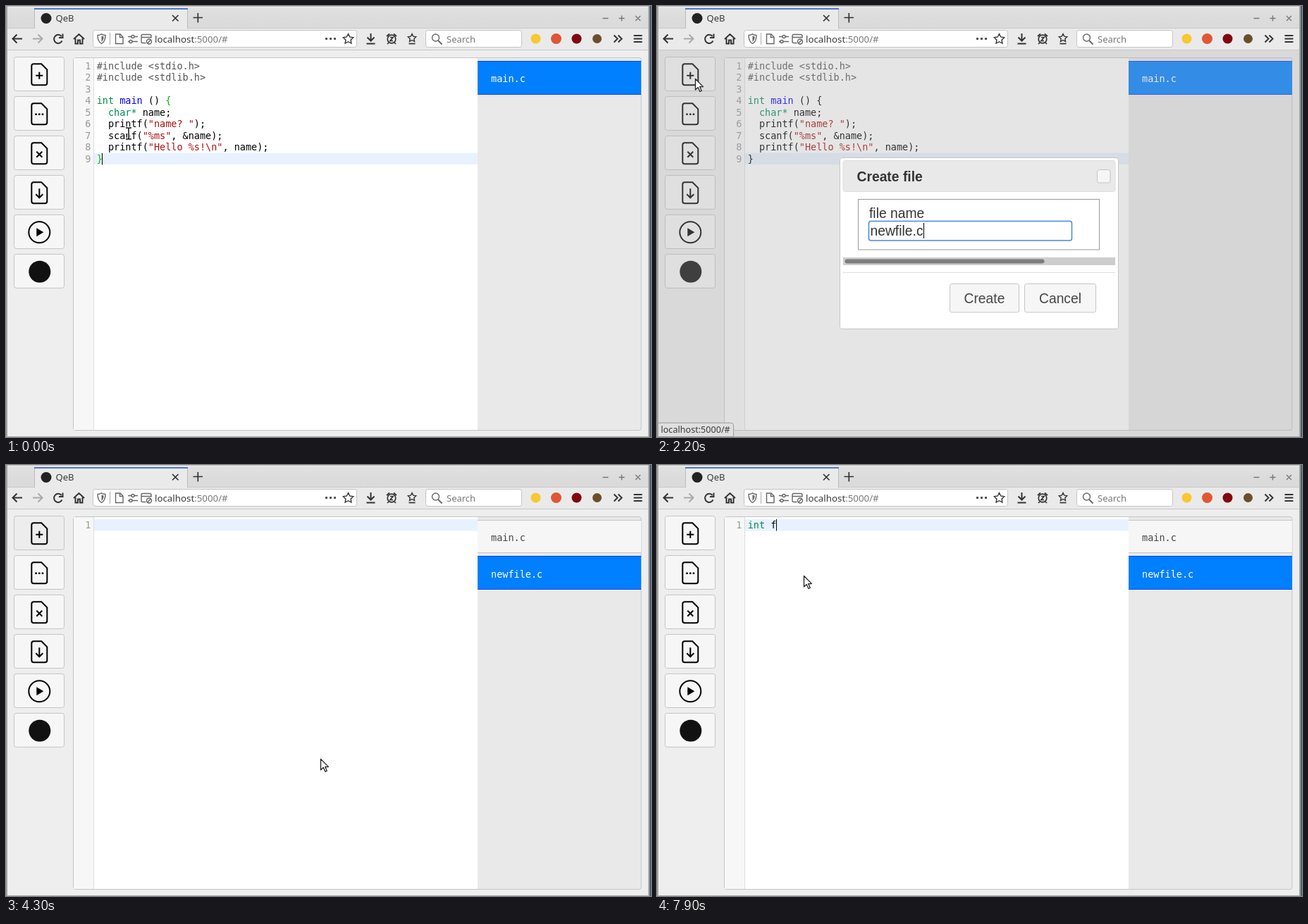
These frames come from a looping animation (915x612 px, 8 s). An HTML page:

```html
<!DOCTYPE html>
<html lang="en">
<head>
<meta charset="utf-8">
<title>Code editor</title>
<style>
html, body { margin: 0; width: 100%; height: 100%; overflow: hidden; background: #eee; }
svg { display: block; width: 915px; height: 612px; }
text { white-space: pre; }
.ui { font: 13.3px "Noto Sans", sans-serif; fill: #3a3a3a; }
.code { font: 13.5px "DejaVu Sans Mono", monospace; }
.dialog { font: 19.3px "Liberation Sans", Arial, sans-serif; fill: #333; }
.num { fill: #999; text-anchor: end; }
.line { fill: none; stroke: #333; stroke-width: 1.7; }
.bold { stroke-width: 2; }
.icon { fill: none; stroke: #000; stroke-width: 2; }
.box { fill: #f6f6f6; stroke: #c5c5c5; }
.on { fill: #007fff; stroke: #003eff; }
.meta { fill: #555; } .type { fill: #085; } .def { fill: #00f; } .str { fill: #a11; }
.match { fill: #0b0; }
.blurred .match { fill: #000; }
</style>
</head>
<body>
<svg viewBox="0 0 915 612">
  <defs>
    <linearGradient id="titleBar" x2="0" y2="1">
      <stop stop-color="#e2e2e2"/><stop offset=".5" stop-color="#dcdcdc"/><stop offset="1" stop-color="#dadada"/>
    </linearGradient>
    <clipPath id="panel"><path d="M669 74H901V602H669Z"/></clipPath>
  </defs>

  <!-- window frame, tab strip, toolbar -->
  <rect width="915" height="612" fill="#eee"/>
  <rect width="915" height="32" fill="url(#titleBar)"/>
  <path d="M0 .5H915" stroke="#bbb"/>
  <path d="M0 1.5H915" stroke="#efefef"/>
  <rect y="32" width="915" height="31" fill="#eaeaea"/>
  <path d="M2 31.5H40M258 31.5H912M2 62.5H912" stroke="#c8c8c8"/>
  <rect x="40" y="3" width="218" height="29" fill="#eaeaea"/>
  <path d="M40.5 4V32M257.5 4V32" stroke="#bbb"/>
  <rect x="40" y="3" width="218" height="2" fill="#5179c4"/>
  <circle cx="57" cy="17.500" r="7.500" fill="#222"/>
  <text class="ui" x="70.500" y="22" style="font-size:13px">QeB</text>
  <path class="line" d="M236 13l8.500 8.500M244.500 13l-8.500 8.500M265.500 16.500h13.500M272.300 10v13.500"/>
  <path class="line" style="stroke:#777;stroke-width:1.4" d="M846.500 17.500h8M869.500 17.500h8M873.500 13.500v8M893 14l7 7M900 14l-7 7"/>
  <path class="line bold" d="M23 46.500H10M15.500 40.500l-6 6 6 6"/>
  <path class="line bold" style="stroke:#aaa" d="M38 46.500H51M45.500 40.500l6 6-6 6"/>
  <path class="line bold" d="M79.500 49.500a6 6 0 1 1-.8-6.500M80.500 39.500v5.500h-5.500"/>
  <path class="line bold" d="M96 47l7.500-7 7.500 7M98.500 46v7.500h3.500v-5h3v5h3.500V46"/>
  <g fill="#fff" stroke="#c4c4c4">
    <rect x="123.500" y="34.500" width="374" height="24" rx="3"/>
    <rect x="595.500" y="34.500" width="136" height="24" rx="3"/>
  </g>
  <text class="ui" x="211" y="51.500">localhost<tspan fill="#777">:5000/#</tspan></text>
  <text class="ui" x="625" y="51.500" style="fill:#777;font-size:13px">Search</text>
  <path d="M147.500 38V55" stroke="#aaa"/>
  <g class="line" style="stroke:#666;stroke-width:1.4">
    <path d="M130 41.500q3.500 0 5.500-1.700q2 1.700 5.500 1.700q0 9-5.500 12q-5.500-3-5.500-12Z"/>
    <path d="M135.500 42.500v8.500q3-2.500 3.200-7.500Z" fill="#666" stroke="none"/>
    <path d="M155.500 40h6.500l4 4v9.500h-10.500ZM161.500 40v4.500h4.500"/>
    <path d="M173 43.500h5M182 43.500h5M173 50.500h2M179 50.500h8"/>
    <circle cx="180" cy="43.500" r="2"/><circle cx="177" cy="50.500" r="2"/>
    <path d="M198.500 52.500h-4.500q-2 0-2-2v-8q0-2 2-2h10q2 0 2 2v3M192 44.500h14"/>
    <circle cx="203" cy="50.500" r="3.500"/><path d="M200.500 53l5-5"/>
    <circle cx="609.500" cy="45" r="5"/><path d="M613 49l5.500 5.500" stroke-width="2"/>
  </g>
  <path d="M453 46.500h3m3 0h3m3 0h3" stroke="#555" stroke-width="3"/>
  <path class="line" id="star" style="stroke-width:1.4"/>
  <path class="line" id="trayStar" style="stroke-width:1.4"/>
  <path class="line" d="M571.500 53.500h9"/>
  <path class="line bold" d="M517.500 39v10M512.500 44.500l5 5 5-5M511.500 53.500h12"/>
  <circle class="line" cx="547" cy="47" r="5.800"/>
  <path class="line" d="M540 43l4-3.500M554 43l-4-3.500M545 44.500h4l-4 5h4M543 52l-2 2M551 52l2 2"/>
  <circle cx="751.500" cy="46.500" r="7" fill="#f8c832"/>
  <circle cx="780.500" cy="46.500" r="7.500" fill="#de5833"/>
  <circle cx="809.500" cy="46.500" r="7" fill="#800610"/>
  <circle cx="838.500" cy="46.500" r="6.500" fill="#6b4e2c"/>
  <path class="line bold" d="M862.500 41.500l5 5-5 5M868.500 41.500l5 5-5 5M890.500 42h12M890.500 46.500h12M890.500 51h12"/>

  <!-- page -->
  <g id="tools"></g>
  <rect x="95.500" y="73.500" width="805.500" height="529" rx="3" fill="#e9e9e9" stroke="#c5c5c5"/>
  <rect x="96" y="74" width="28" height="528" fill="#f7f7f7"/>
  <rect x="125" y="74" width="544" height="528" fill="#fff"/>
  <path d="M124.500 74V602" stroke="#ddd"/>
  <rect id="activeLine" x="125" width="544" height="16.500" fill="#e8f2ff"/>
  <g id="mainCode" class="code"></g>
  <g id="newCode" class="code">
    <text class="num" x="120.500" y="90">1</text>
    <text x="128.650" y="90"><tspan id="typed"></tspan><tspan id="typedRest"></tspan></text>
  </g>
  <rect id="caret" width="1" height="16.500"/>
  <!-- tabs run past the panel, so only their top and bottom borders show -->
  <g class="code" clip-path="url(#panel)">
    <rect id="mainTab" x="666" y="78.500" width="238" height="47"/>
    <text id="mainLabel" x="688" y="108">main.c</text>
    <g id="newTab">
      <rect class="on" x="666" y="129.500" width="238" height="47"/>
      <text id="newLabel" x="688" y="159.500" fill="#fff">newfile.c</text>
    </g>
  </g>

  <!-- modal dialog -->
  <g id="modal" class="dialog">
    <rect x="2" y="63" width="910" height="549" fill="#aaa" fill-opacity=".3"/>
    <rect x="259.500" y="215.500" width="395" height="243" rx="3" fill="#fff" stroke="#c5c5c5"/>
    <rect x="264" y="219.500" width="386" height="44" rx="3" fill="#e9e9e9" stroke="#ddd"/>
    <text x="283.500" y="248.500" font-weight="bold">Create file</text>
    <rect class="box" x="624.500" y="232.500" width="18.500" height="18.500" rx="3"/>
    <path id="closeMark" d="M630.500 238.500l7 7M637.500 238.500l-7 7" stroke="#555" stroke-width="3"/>
    <rect x="285.500" y="274.500" width="342" height="71.500" fill="none" stroke="#999"/>
    <text x="301" y="301">file name</text>
    <rect id="field" x="300.500" y="305.500" width="288" height="27.500" rx="3" fill="#fff"/>
    <text x="302.500" y="326">newfile.c</text>
    <rect id="fieldCaret" x="378" y="308" width="1" height="22" fill="#000"/>
    <rect x="264" y="357" width="386" height="11" fill="#cdcdcd"/>
    <rect x="266.500" y="359.500" width="283" height="6" rx="3" fill="#7d7d7d"/>
    <path d="M264 378.500H650" stroke="#ddd"/>
    <rect id="create" x="415.500" y="394.500" width="98" height="40.500" rx="3"/>
    <text id="createLabel" x="435.500" y="421.500">Create</text>
    <rect class="box" x="521.500" y="394.500" width="101" height="40.500" rx="3"/>
    <text x="542" y="421.500" fill="#454545">Cancel</text>
  </g>

  <!-- window edge -->
  <path d="M1 0V612" stroke="#a3a3a3" stroke-width="2"/>
  <path d="M912 0V612" stroke="#a8a8a8" stroke-width="2"/>
  <path d="M914 0V612" stroke="#4a6078" stroke-width="2"/>
  <path d="M0 611.500H912" stroke="#aaa"/>
  <g id="status">
    <path d="M1.500 611.500V592H105q3.500 0 3.500 3.500V611.500Z" fill="#e0e0e0" stroke="#999"/>
    <text class="ui" x="5.500" y="606" style="font-size:12.6px">localhost:5000/#</text>
  </g>

  <g id="pointer" stroke-linejoin="round">
    <path id="arrow" d="M.5.5V16L4.200 12.600 6.900 18.500 9.300 17.400 6.700 11.600H11.500Z" fill="#fff" stroke="#222" stroke-width="1.300"/>
    <path id="hand" d="M-1.500 1.500Q0-.5 1.500 1.500V5.500Q3 4.500 4 6Q6 5 6.800 6.500Q9.500 6 9.500 8.500V11L8 14.500H-1L-5 9Q-5 7-3 7.500L-1.500 9Z" fill="#fff" stroke="#111" stroke-width="1.300"/>
    <g id="beam" fill="none">
      <path d="M-4-8H-1L0-7 1-8H4M0-7V7M-4 8H-1L0 7 1 8H4" stroke="#fff" stroke-width="3.500"/>
      <path d="M-4-8H-1L0-7 1-8H4M0-7V7M-4 8H-1L0 7 1 8H4" stroke="#111" stroke-width="1.500"/>
    </g>
  </g>
</svg>
<script>
const $ = id => document.getElementById(id);
const set = (id, attrs) => { for (const k in attrs) $(id).setAttribute(k, attrs[k]); };
const show = (id, visible) => set(id, { visibility: visible ? 'visible' : 'hidden' });
const escapeHtml = s => s.replace(/&/g, '&amp;').replace(/</g, '&lt;');
const span = (cls, s) => `<tspan class="${cls}">${escapeHtml(s)}</tspan>`;

const starPath = (cx, cy, r) => 'M' + Array.from({ length: 10 }, (_, i) => {
  const a = i * Math.PI / 5, d = i % 2 ? r * 0.5 : r;
  return `${cx + d * Math.sin(a)} ${cy - d * Math.cos(a)}`;
}).join('L') + 'Z';
set('star', { d: starPath(485.5, 47, 7.5) });
set('trayStar', { d: starPath(576, 45.5, 6) });

// Tool buttons; each icon is drawn around its button's centre
const file = '<path d="M-8-15H3L11-7V12a3 3 0 0 1-3 3H-8a3 3 0 0 1-3-3V-12a3 3 0 0 1 3-3Z"/>';
const icons = [
  file + '<path d="M-5 1.500H5M0-3.500V6.500"/>',
  file + '<path d="M-6 .5h2.500m2.200 0h2.500m2.200 0h2.500" stroke-width="2.500"/>',
  file + '<path d="M-4-2.500L4 5.500M4-2.500L-4 5.500"/>',
  file + '<path d="M0-6V7M-5 2L0 7 5 2"/>',
  '<circle r="15"/><path d="M-4-6L6 0-4 6Z" fill="#000" stroke="none"/>',
  '<circle cx=".5" r="15.500" fill="#111" stroke="none"/>'
];
$('tools').innerHTML = icons.map((icon, i) => `<rect id="tool${i}" class="box" x="11.500" y="${72.5 + 56 * i}"
  width="71" height="48" rx="3"/><g class="icon" transform="translate(47.300 ${97.3 + 56 * i})">${icon}</g>`).join('');

const LINE = 16.45, TEXT_X = 128.65, CHAR = 8.127;
const source = [
  span('meta', '#include <stdio.h>'),
  span('meta', '#include <stdlib.h>'),
  '',
  span('type', 'int') + ' ' + span('def', 'main') + ' () ' + span('match', '{'),
  '  ' + span('type', 'char*') + ' name;',
  '  printf(' + span('str', '"name? "') + ');',
  '  scanf(' + span('str', '"%ms"') + ', &amp;name);',
  '  printf(' + span('str', '"Hello %s!\\n"') + ', name);',
  span('match', '}')
];
$('mainCode').innerHTML = source.map((s, i) => {
  const y = 90 + LINE * i;
  return `<text class="num" x="120.500" y="${y}">${i + 1}</text><text x="${TEXT_X}" y="${y}">${s}</text>`;
}).join('');

// Pointer hotspot: [time, x, y]
const path = [
  [600, 174, 181], [800, 160, 174], [1200, 90, 135], [1500, 64, 116], [1900, 54, 102.5],
  [2600, 54, 102.5], [2800, 170, 180], [3000, 308, 264],
  [3100, 308, 264], [3500, 395, 355], [3800, 446, 416.5],
  [4600, 446, 416.5], [4900, 268, 233], [5000, 268, 233],
  [5200, 165, 190], [5300, 118, 174], [5500, 208, 157]
];
function pointerAt(t) {
  const i = path.findIndex(p => p[0] > t);
  if (i === 0) return path[0].slice(1);
  if (i < 0) return path[path.length - 1].slice(1);
  const [t0, x0, y0] = path[i - 1], [t1, x1, y1] = path[i];
  const k = (t - t0) / (t1 - t0);
  return [x0 + (x1 - x0) * k, y0 + (y1 - y0) * k];
}

const keyTimes = [6600, 6800, 6900, 7100, 7900];
const during = (t, ...spans) => spans.some(([a, b]) => t >= a && t < b);

function draw(now) {
  const t = Math.floor(now % 8000 / 100) * 100;
  const modal = during(t, [2200, 4300]);
  const created = t >= 4300;
  const [x, y] = pointerAt(t);

  // Editor
  show('mainCode', !created);
  $('mainCode').classList.toggle('blurred', modal);
  show('newCode', created);
  show('newTab', created);
  const typed = 'int f'.slice(0, keyTimes.filter(k => t >= k).length);
  $('typed').textContent = typed.slice(0, 3);
  $('typedRest').textContent = typed.slice(3);
  set('typed', { class: typed.startsWith('int') ? 'type' : '' });
  set('activeLine', { y: created ? 77 : 77 + LINE * 8 });
  set('caret', { x: Math.floor(TEXT_X + CHAR * (created ? typed.length : 1)), y: created ? 77 : 209 });
  show('caret', during(t, [0, 500], [1000, 1500], [2100, 2200], [5900, 6400], [6600, 7600], [7900, 8000]));

  // File list
  set('mainTab', { class: created ? 'box' : 'on', height: created ? 46 : 47 });
  set('mainLabel', { fill: created ? '#454545' : '#fff' });
  set('newLabel', { 'font-style': during(t, [6900, 7900]) ? 'italic' : 'normal' });
  $('tool0').style.fill = during(t, [1500, 2200], [4300, 5900]) ? '#ededed' : '';

  // Dialog
  const pressed = t >= 4200;
  const overCreate = modal && x > 415 && x < 514 && y > 394 && y < 435;
  show('modal', modal);
  show('closeMark', modal && t >= 2300);
  show('fieldCaret', modal && !pressed);
  set('field', { stroke: pressed ? '#ddd' : '#4a88d8', 'stroke-width': pressed ? 1 : 1.5 });
  set('create', { class: pressed ? 'on' : 'box' });
  $('create').style.fill = overCreate && !pressed ? '#ededed' : '';
  set('createLabel', { fill: pressed ? '#fff' : overCreate ? '#2b2b2b' : '#454545' });

  show('status', during(t, [1600, 2400], [4400, 6200]));

  // Pointer shape follows what lies beneath it
  const overTool = !modal && !created && x < 83 && y < 121;
  const overText = modal ? x > 301 && x < 589 && y > 305 && y < 333 : !created && x > 125;
  const shape = overTool || overCreate ? 'hand' : overText ? 'beam' : 'arrow';
  for (const id of ['arrow', 'hand', 'beam']) show(id, id === shape);
  set('pointer', { transform: `translate(${Math.round(x)} ${Math.round(y)})` });
}

const start = performance.now();
function tick() {
  draw(performance.now() - start);
  requestAnimationFrame(tick);
}
tick();
</script>
</body>
</html>
```
